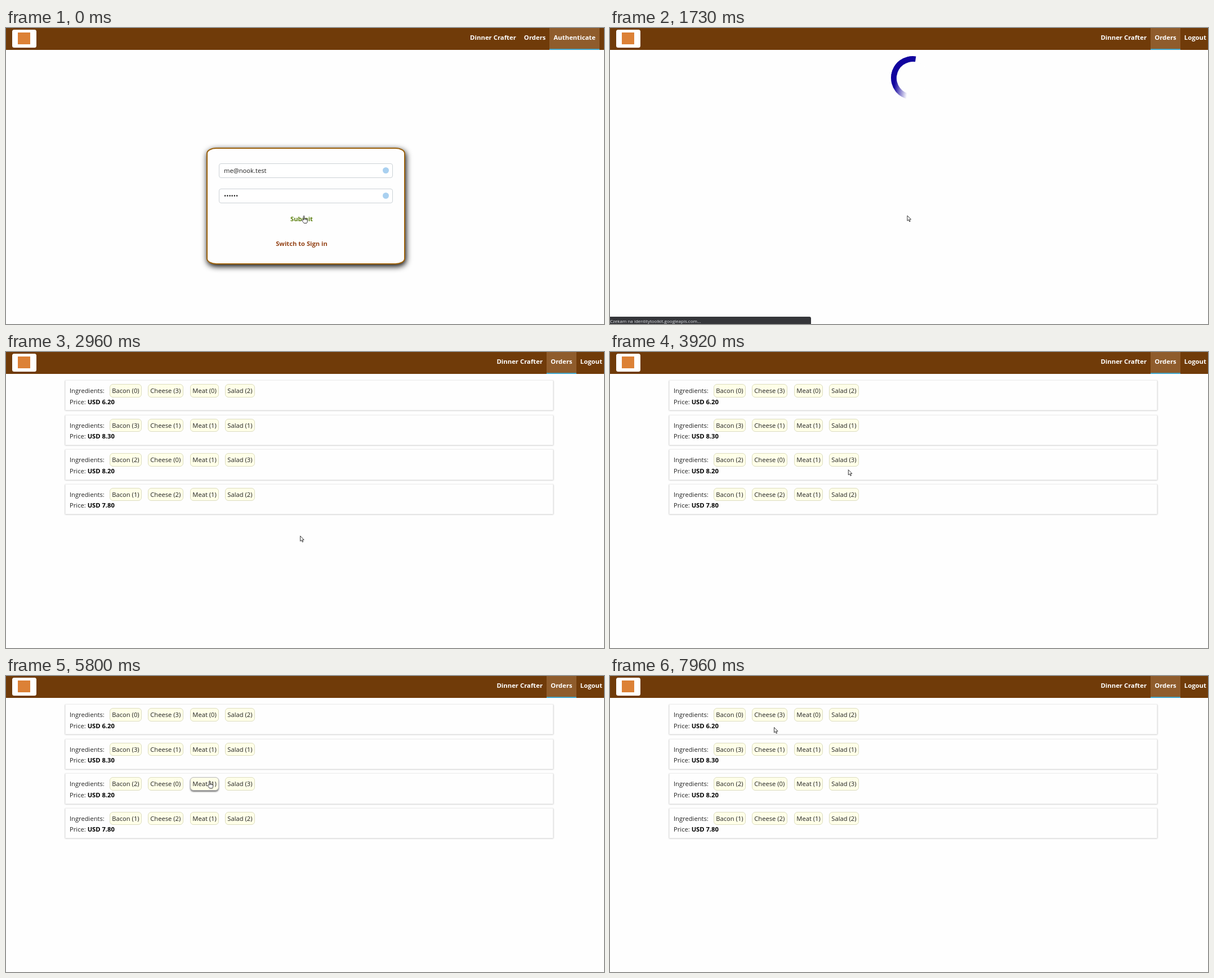
Write an HTML page that moves like this. It is 1062 px wide and 527 px high and loops after 7990 ms.

```html
<!DOCTYPE html>
<html lang="en">
<head>
<meta charset="utf-8">
<title>Order history</title>
<style>
html, body { margin: 0; width: 100%; height: 100%; overflow: hidden; background: #fefefe; }
body { position: relative; font: 11.2px/20px "Open Sans", sans-serif; color: #222; white-space: nowrap; }
div, svg { position: absolute; box-sizing: border-box; }
.page { inset: 0; }
header { position: absolute; left: 0; top: 0; width: 100%; height: 38.6px; background: #703b09; }
.logo { left: 10.6px; top: 2.6px; width: 43.4px; height: 32px; border-radius: 3.5px; background: #fff; }
.logo i { position: absolute; left: 10.5px; top: 5px; width: 22px; height: 21px; background: #dc8136; }
nav { position: absolute; top: 0; display: flex; color: #fff; font-size: 11.35px; font-weight: bold; line-height: 34px; }
nav span { box-sizing: border-box; height: 38.6px; padding: 0 7px; }
nav .on { background: #8f5c2c; border-bottom: 2.6px solid #40a4c8; }

.form { left: 356px; top: 213px; width: 353px; height: 208px; border: 2px solid #9c620d; border-radius: 5%;
  background: #fefefe; box-shadow: 1.4px 3.5px 10.5px #000; }
.field { left: 20px; width: 309px; height: 26px; padding-left: 8px; line-height: 24px;
  border: 1px solid #ccd2d6; border-radius: 4px; background: #fff; }
.field i { position: absolute; right: 6px; top: 6px; width: 11px; height: 11px; border-radius: 50%; background: #a9d0f0; }
.link { left: 0; width: 334px; text-align: center; font-weight: bold; }

.spin { left: 499px; top: 49.5px; width: 78px; height: 78px; border-radius: 50%;
  background: linear-gradient(to right, #11039e 10%, transparent 42%); }
.spin::before { content: ""; position: absolute; width: 50%; height: 50%; border-radius: 100% 0 0 0; background: #11039e; }
.spin::after { content: ""; position: absolute; inset: 12.5%; border-radius: 50%; background: #fefefe; }

.order { left: 105px; width: 867px; height: 54.4px; border: 1px solid #eee; background: #fefefe;
  box-shadow: 0 1.4px 2.1px #aaa; }
.label { left: 7px; top: 8px; }
.price { left: 7px; top: 27.6px; }
.price b { color: #000; }
.tag { top: 6px; height: 23.6px; padding: 0 3.3px; line-height: 22px; border: 1px solid #dcdcc0;
  border-radius: 6px; background: #ffffe8; }
.tag.hover { box-shadow: 0 2px 2.5px #777; border-color: #bbb; }

.status { left: 0; top: 514px; width: 357px; height: 13px; border-radius: 0 3px 0 0; background: #35363a;
  color: #e4e6ea; font-size: 8px; line-height: 16px; }
#cursor { left: 0; top: 0; overflow: visible; fill: #fff; stroke: #222; stroke-width: .9; stroke-linejoin: round; }
</style>
</head>
<body>
<div class="page" id="form">
  <div class="form">
    <div class="field" style="top:26px">me@nook.test<i></i></div>
    <div class="field" style="top:71px">••••••<i></i></div>
    <div class="link" style="top:115px;color:#5c8010">Submit</div>
    <div class="link" style="top:159px;color:#944317">Switch to Sign in</div>
  </div>
</div>
<div class="page" id="loading"><div class="spin" id="spin"></div></div>
<div class="page" id="orders"></div>
<header>
  <div class="logo"><i></i></div>
  <nav id="guest"><span>Dinner Crafter</span><span>Orders</span><span class="on">Authenticate</span></nav>
  <nav id="member" style="right:-4px"><span>Dinner Crafter</span><span class="on">Orders</span><span>Logout</span></nav>
</header>
<div class="status" id="status"></div>
<svg id="cursor" width="12" height="16"><path id="shape"/></svg>
<script>
const LOOP = 7990, SUBMIT = 810, LOGIN = 1610, LOADED = 2200;
const $ = id => document.getElementById(id);
const show = (id, on) => $(id).style.visibility = on ? "visible" : "hidden";
const clamp = v => Math.max(0, Math.min(1, v));

const ARROW = "M0 0V9.3L2.2 7.3 3.7 10.8 5.2 10.2 3.7 6.8H6.6z";
const HAND = "M3.2 8V1.4q0-1 .9-1t.9 1V5.2q1.6-.6 1.8.4 1.5-.5 1.8.5 1.6-.3 1.6 1V10q0 2-1.2 3.5H4.2" +
  "Q2.5 11.5 .8 9 .3 7.8 1.3 7.6 2.2 7.6 3.2 8zM5 5.2V7.6M6.8 5.6V7.7M8.6 6.1V7.9";

// name, left, right
const TAGS = [["Bacon", 184, 241], ["Cheese", 252, 315.5], ["Meat", 327, 378], ["Salad", 389, 442.5]];
const ORDERS = [["0302", "6.20"], ["3111", "8.30"], ["2013", "8.20"], ["1212", "7.80"]];
const rowTop = row => 50 + 61.6 * row;

$("orders").innerHTML = ORDERS.map(([counts, price], row) =>
  `<div class="order" style="top:${rowTop(row)}px"><div class="label">Ingredients:</div>` +
  TAGS.map(([name, left], i) => `<div class="tag" style="left:${left - 106}px">${name} (${counts[i]})</div>`).join("") +
  `<div class="price">Price: <b>USD ${price}</b></div></div>`).join("");
const tags = [...document.querySelectorAll(".tag")];

// start, end, x, y
const MOVES = [
  [2930, 3530, 428.5, 215.5], [3800, 4270, 411.5, 196.5], [4860, 5410, 360.5, 186.5],
  [5800, 6520, 356, 137], [6850, 7300, 293, 131], [7610, 7960, 291.5, 91.5]
];
function cursorAt(t) {
  let x = 528, y = 334;
  for (const [start, end, toX, toY] of MOVES) {
    const p = clamp((t - start) / (end - start)), e = p + p * p - p * p * p;
    x += (toX - x) * e;
    y += (toY - y) * e;
  }
  return [x, y];
}

function hoveredTag(x, y) {
  for (let row = 0; row < ORDERS.length; row++) {
    const top = rowTop(row) + 7;
    const col = TAGS.findIndex(([, left, right]) => x >= left && x <= right);
    if (col >= 0 && y >= top && y <= top + 24) return row * TAGS.length + col;
  }
  return -1;
}

const fade = (t, start, end) => Math.min(clamp((t - start) / 120), clamp((end - t) / 200));

function draw() {
  const t = performance.now() % LOOP;
  const loaded = t >= LOADED;
  show("form", t < SUBMIT);
  show("loading", t >= SUBMIT && !loaded);
  show("orders", loaded);
  show("guest", t < LOGIN);
  show("member", t >= LOGIN);
  $("guest").style.right = t < SUBMIT ? "8px" : "-4px";
  $("spin").style.transform = `rotate(${(t - (t < LOGIN ? 987 : 1700)) / 1400 * 360}deg)`;

  const host = loaded ? "react-build-burger-project.firebaseio.com" : "identitytoolkit.googleapis.com";
  $("status").textContent = `Czekam na ${host}...`;
  $("status").style.opacity = Math.max(fade(t, 1610, 2158), fade(t, 3950, 4700));

  const [x, y] = cursorAt(t);
  const hit = loaded ? hoveredTag(x, y) : -1;
  tags.forEach((tag, i) => tag.classList.toggle("hover", i === hit));
  const hand = hit >= 0 || t < SUBMIT;
  $("shape").setAttribute("d", hand ? HAND : ARROW);
  $("cursor").style.transform = `translate(${hand ? x - 3 : x}px, ${y}px)`;
  requestAnimationFrame(draw);
}
draw();
</script>
</body>
</html>
```
